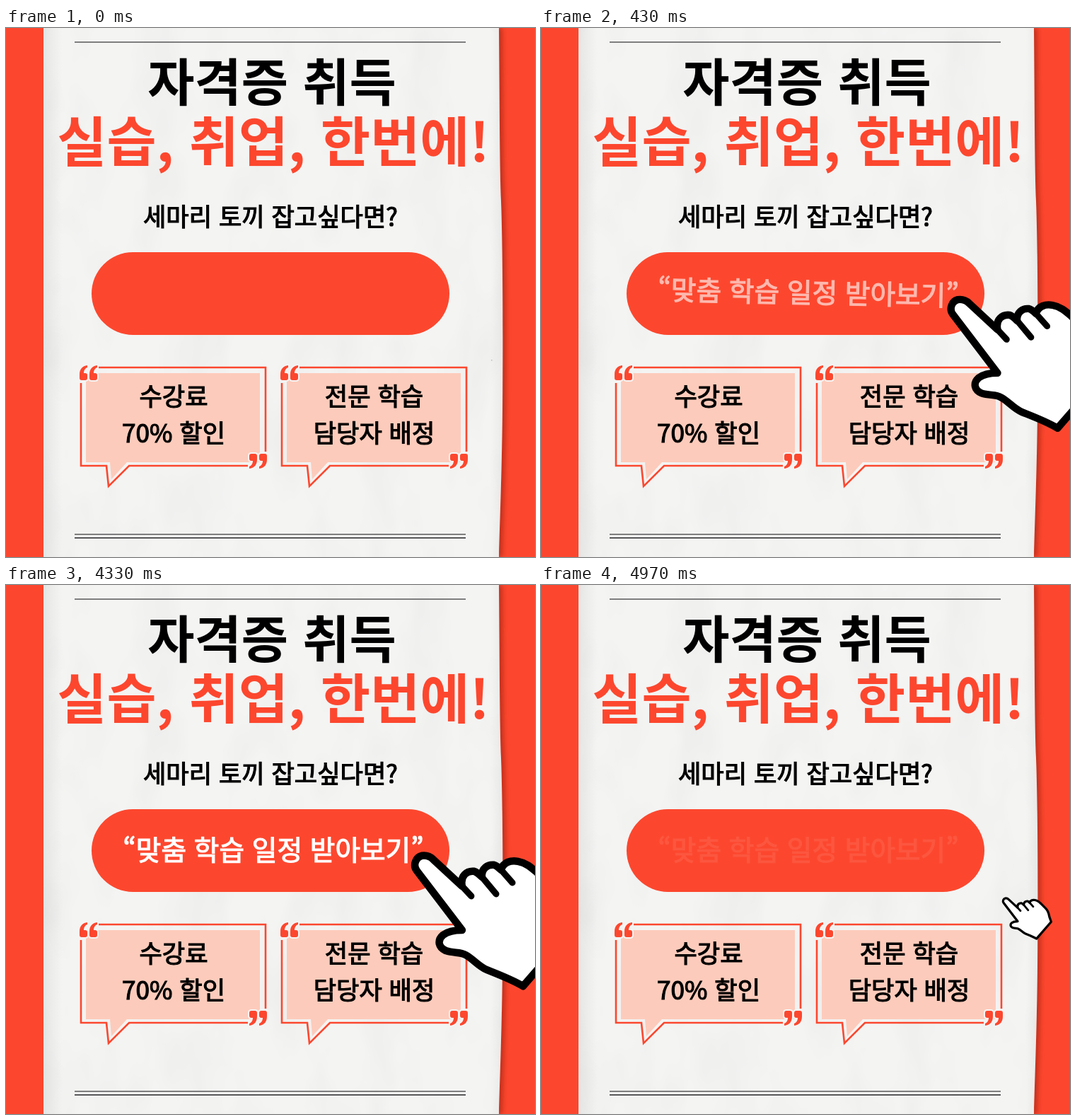
Write an HTML page that moves like this. It is 748 px wide and 748 px high and loops after 5010 ms.

```html
<!DOCTYPE html>
<html lang="ko">
<head>
<meta charset="utf-8">
<style>
  html, body { margin: 0; width: 100%; height: 100%; overflow: hidden; background: #fc472e; }
  svg { display: block; width: 100vw; height: 100vh; }
  text {
    font: 400 35.2px "Noto Sans CJK KR", "Noto Sans CJK", "Noto Sans KR", sans-serif;
    text-anchor: middle;
    stroke: currentColor;
    stroke-width: 1.2px;
    fill: currentColor;
  }
  .title { font-weight: 700; stroke: none; }
  .red { color: #fc472e; }
  #label { font-size: 38.7px; color: #fff; }
</style>
</head>
<body>
<svg viewBox="0 0 748 748">
  <defs>
    <path id="sheet" d="M53 0H697C698 120 698 200 700 245C702 300 703 400 702 540C701 640 698 700 697 748H53Z"/>
    <clipPath id="inside"><use href="#sheet"/></clipPath>
    <filter id="blur" x="-5%" width="110%"><feGaussianBlur stdDeviation="3"/></filter>
    <filter id="crease" x="0" y="0" width="100%" height="100%">
      <feTurbulence type="fractalNoise" baseFrequency=".016 .008" numOctaves="3" seed="4"/>
      <feColorMatrix values="0 0 0 0 .3  0 0 0 0 .3  0 0 0 0 .3  .14 0 0 0 -.06"/>
    </filter>
    <linearGradient id="edges">
      <stop offset="0" stop-color="#666" stop-opacity=".1"/>
      <stop offset=".04" stop-color="#666" stop-opacity="0"/>
      <stop offset=".97" stop-color="#666" stop-opacity="0"/>
      <stop offset="1" stop-color="#666" stop-opacity=".08"/>
    </linearGradient>
    <path id="mark" d="M-6 -1C-6 -9 -2 -13 5 -14V-11C2 -10 0 -7 0 -3H2Q5 -3 5 0V4Q5 7 2 7H-3Q-6 7 -6 4Z"/>
    <g id="quote"><use href="#mark" x="-7"/><use href="#mark" x="7"/></g>
    <g id="bubble">
      <path fill="#fdcbbb" d="M113 488H359V614H171L149 638L147 614H113Z"/>
      <path fill="none" stroke="#fc472e" stroke-width="2.6" d="M131 480H367V599M342 619H174L145 648L142 619H106V502"/>
      <g fill="#fc472e" stroke="#f4f4f3" stroke-width="4" paint-order="stroke">
        <use href="#quote" x="117" y="491"/>
        <use href="#quote" transform="translate(356 609) rotate(180)"/>
      </g>
    </g>
  </defs>

  <rect width="748" height="748" fill="#fc472e"/>
  <use href="#sheet" x="5" fill="#8e1f0c" opacity=".5" filter="url(#blur)"/>
  <use href="#sheet" fill="#f4f4f3"/>
  <g clip-path="url(#inside)">
    <rect x="53" width="652" height="748" filter="url(#crease)"/>
    <rect x="53" width="652" height="748" fill="url(#edges)"/>
  </g>

  <g stroke="#58585a">
    <path stroke-width="1.6" d="M97 20H650M97 716H650"/>
    <path stroke-width="2" d="M97 721H650"/>
  </g>

  <text class="title" x="376" y="103" style="font-size:72px">자격증 취득</text>
  <text class="title red" x="378" y="189" style="font-size:76.2px">실습, 취업, 한번에!</text>
  <text x="374" y="279.5">세마리 토끼 잡고싶다면?</text>

  <rect x="121" y="317" width="506" height="117" rx="58.5" fill="#fc472e"/>
  <text id="label" x="378" y="388.5">“맞춤 학습 일정 받아보기”</text>

  <use href="#bubble"/>
  <use href="#bubble" x="284"/>
  <text x="237" y="533.5">수강료</text>
  <text x="237" y="585.5">70% 할인</text>
  <text x="520.5" y="533.5">전문 학습</text>
  <text x="520.5" y="585.5">담당자 배정</text>

  <g id="hand" stroke="#000" stroke-width="10.5" stroke-linejoin="round" stroke-linecap="round">
    <path fill="#fff" d="M581 404C575 396 580 385 588 383C595 382 600 384 604 388L645 426
      C642 411 652 404 662 405C666 406 669 409 673 413C672 401 681 395 690 396C694 397 697 400 700 403
      C703 392 714 389 724 391C735 393 742 399 750 406L774 430C786 442 787 455 790 468L798 490L731 567
      C714 557 695 550 680 544C668 539 660 528 650 523C642 518 634 521 622 517C611 512 610 502 618 495
      C626 489 636 488 645 488Z"/>
    <path fill="none" stroke-width="9" d="M645 426L658 440M673 413L693 437M700 403L716 421"/>
  </g>
</svg>
<script>
  const LOOP = 5010, LAST = 4970;
  const label = document.getElementById('label');
  const hand = document.getElementById('hand');
  const clamp = v => Math.min(1, Math.max(0, v));

  const elastic = u => u <= 0 ? 0 : u >= 1 ? 1
    : 1 + 2 ** (-10 * u) * Math.sin((10 * u - .75) * 2 * Math.PI / 3);

  function draw(t) {
    const size = t < 2500 ? elastic(t / 776) : elastic((4993 - t) / 830);
    hand.setAttribute('transform', `translate(687 470) scale(${size}) translate(-687 -470)`);

    const swing = -6.15 * clamp(1 - t / 1300) * Math.cos(.00432 * t);
    label.setAttribute('transform', `rotate(${swing} 378 375)`);
    label.setAttribute('opacity', Math.min(clamp(t / 700), clamp((4990 - t) / 250)));
  }

  const start = performance.now();
  function tick(now) {
    draw(Math.min(Math.max(0, now - start) % LOOP, LAST));
    requestAnimationFrame(tick);
  }
  draw(0);
  requestAnimationFrame(tick);
</script>
</body>
</html>
```
